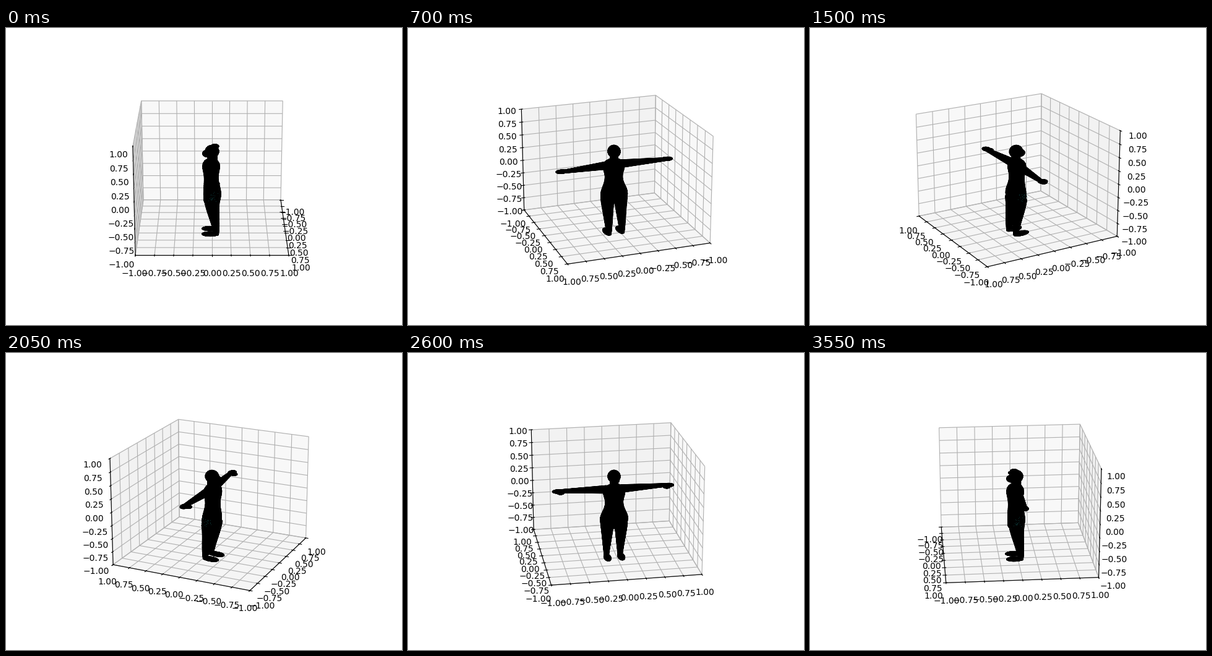
Animation of 640x480 px, one loop 3.6 s. Source, as a matplotlib script:

```python
import numpy as np
import matplotlib.pyplot as plt
from matplotlib.animation import FuncAnimation
from mpl_toolkits.mplot3d.art3d import Poly3DCollection

FRAMES, INTERVAL = 72, 50
ELEVATION = 20
SIDES = 16


def bump(x, centre, width):
    return np.exp(-((x - centre) / width) ** 2)


def tube(axis, pos, centre, radii):
    """Quads and end caps of a tube with elliptic sections along an axis."""
    turn = np.linspace(0, 2 * np.pi, SIDES, endpoint=False)
    others = [a for a in range(3) if a != axis]
    rings = np.empty((len(pos), SIDES, 3))
    rings[..., axis] = pos[:, None]
    for a, c, r, wave in zip(others, centre, radii, (np.cos, np.sin)):
        c, r = (np.broadcast_to(value, pos.shape)[:, None] for value in (c, r))
        rings[..., a] = c + r * wave(turn)
    after = np.roll(rings, -1, axis=1)
    quads = np.stack([rings[:-1], after[:-1], after[1:], rings[1:]], axis=2)
    return list(quads.reshape(-1, 4, 3)) + [rings[0], rings[-1]]


def ellipsoid(centre, radii):
    (x, y, z), (rx, ry, rz) = centre, radii
    angle = np.linspace(0, np.pi, 10)
    ring = np.sin(angle)
    return tube(2, z + rz * np.cos(angle), (x, y), (rx * ring, ry * ring))


def head():
    skull = ellipsoid((0, 0, 0.45), (0.083, 0.092, 0.11))
    face = ellipsoid((0, -0.055, 0.41), (0.06, 0.073, 0.062))
    neck = tube(2, np.linspace(0.42, 0.25, 3), (0, 0.003), (0.048, 0.06))
    return skull + face + neck


def torso():
    z = np.linspace(0.295, -0.5, 20)
    hips, chest = bump(z, -0.37, 0.2), bump(z, 0.16, 0.13)
    shoulder = np.sqrt(1 - np.clip((z - 0.2) / 0.11, 0, 1) ** 2)
    width = (0.112 + 0.079 * hips + 0.036 * chest) * shoulder
    depth = (0.09 + 0.026 * hips + 0.024 * chest) * shoulder
    return tube(2, z, (0, -0.012 + 0.015 * hips), (width, depth))


def leg(side):
    t = np.linspace(0, 1, 10)
    back = 0.058 * (3 - 2 * t) * t ** 2
    limb = tube(2, -0.45 - 0.67 * t, (side * 0.096, back),
                (0.088 - 0.06 * t, 0.102 - 0.073 * t))
    foot = ellipsoid((side * 0.097, -0.025, -1.105), (0.046, 0.115, 0.035))
    return limb + foot


def arm(side):
    t = np.linspace(0, 1, 8)
    limb = tube(0, side * (0.1 + 0.66 * t), (0.01 + 0.04 * t, 0.205),
                (0.055 - 0.028 * t, 0.068 - 0.046 * t))
    hand = ellipsoid((side * 0.76, 0.04, 0.205), (0.075, 0.055, 0.022))
    thumb = ellipsoid((side * 0.73, 0, 0.19), (0.045, 0.045, 0.016))
    return limb + hand + thumb


def hip_speckles(side, count=22):
    y, z = rng.normal(0, 0.035, count), rng.normal(-0.34, 0.04, count)
    return ax.scatter(np.full(count, 0.18 * side), y, z, s=0.3, linewidths=0,
                      color="#0f4444", depthshade=False, zorder=2)


fig = plt.figure(figsize=(6.4, 4.8), dpi=100)
ax = fig.add_subplot(projection="3d", computed_zorder=False)
rng = np.random.default_rng(4)

faces = head() + torso()
for side in (-1, 1):
    faces += leg(side) + arm(side)
ax.add_collection3d(Poly3DCollection(faces, facecolor="black",
                                     edgecolor="black", linewidth=1, zorder=1))
speckles = {side: hip_speckles(side) for side in (-1, 1)}
ax.set(xlim=(-1, 1), ylim=(-1, 1), zlim=(-1, 1))


def update(i):
    azim = i * 360 / FRAMES
    ax.view_init(elev=ELEVATION, azim=azim)
    # Only the hip turned towards the viewer shows its speckles
    for side, dots in speckles.items():
        dots.set_visible(bool(side * np.cos(np.radians(azim)) > 0.6))
    return []


anim = FuncAnimation(fig, update, frames=FRAMES, interval=INTERVAL,
                     repeat=True, repeat_delay=0)
plt.show()
```
